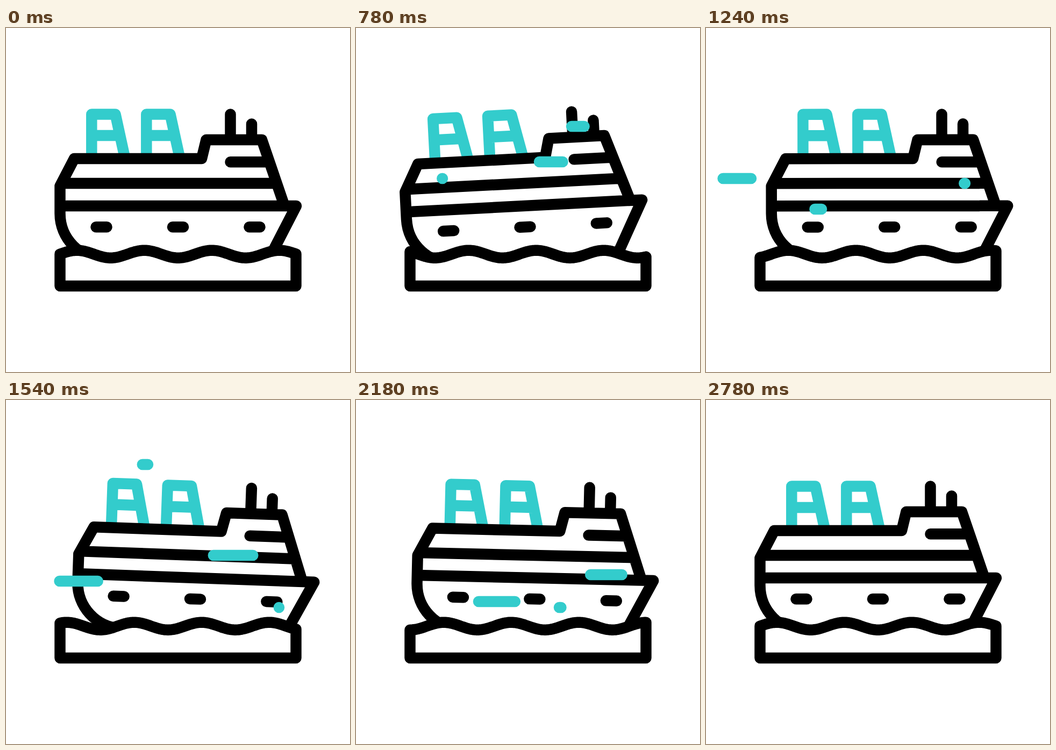
An HTML page that plays this animation: 640 by 640 pixels, repeating every 2.8 s.

```html
<!DOCTYPE html>
<html lang="en">
<head>
<meta charset="utf-8">
<title>Cruise ship</title>
<style>
  html, body { margin: 0; height: 100%; overflow: hidden; background: #fff; }
  svg { display: block; width: 100vw; height: 100vh; }
  g, path { fill: none; stroke-width: 20.5; stroke-linejoin: round; }
  .ink { stroke: #000; stroke-linecap: round; }
  .teal { stroke: #33cccc; }
  #water { fill: #fff; }
  #wind { stroke-linecap: round; }
</style>
</head>
<body>
<svg viewBox="0 0 640 640">
  <g id="ship">
    <g class="teal">
      <path id="funnel" d="M159.3 243V160.5H203.5L221.5 243M159.3 200H212"/>
      <use href="#funnel" x="102"/>
    </g>
    <path class="ink" d="M185 430C138 430 100.5 392 100.5 345V294L127 243H364L372.5 208H476L517 328
      M112 289H502M112 331H540L489 430
      M417.5 249.3H490M417.5 160.5V205M457 178.5V205"/>
    <path id="porthole" class="ink" d="M167.5 370.3h20"/>
    <use href="#porthole" x="142.5"/>
    <use href="#porthole" x="285"/>
  </g>
  <path id="water" class="ink"/>
  <path id="wind" class="teal"/>
</svg>
<script>
const LOOP = 2800, WAVELENGTH = 125.6;
const GUST = { length: 130, duration: 500, delay: 200 };
const [ship, water, wind] = ['ship', 'water', 'wind'].map(id => document.getElementById(id));

// Each gust: start time, then the point it blows left from
const gusts = [
  [217, 531, 183], [275, 471, 249], [760, 161, 280],
  [1145, 215, 337], [1208, 482, 289], [1455, 264, 120],
  [1530, 508, 386], [1720, 564, 325], [1900, 305, 375]
];

function ease(t, start, end) {
  const u = Math.min(1, Math.max(0, (t - start) / (end - start)));
  return u * u * (3 - 2 * u);
}

// Swings from rest to low, across to high, and back to rest
function swing(t, [start, dip, peak, end], low, high) {
  return low * ease(t, start, dip) + (high - low) * ease(t, dip, peak) - high * ease(t, peak, end);
}

function waterPath(t) {
  const crest = 257.4 - 2 * WAVELENGTH * ease(t, 0, LOOP);
  let d = 'M100.5 480';
  for (let x = 100.5; x <= 539.5; x += 2.195) {
    const y = 420.7 - 7 * Math.cos((x - crest) * 2 * Math.PI / WAVELENGTH);
    d += `L${x.toFixed(2)} ${y.toFixed(2)}`;
  }
  return d + 'L539.5 480Z';
}

function gustPath(t, [start, x, y]) {
  const reach = from => x - GUST.length * ease(t, from, from + GUST.duration);
  const head = reach(start), tail = reach(start + GUST.delay);
  return tail - head > 0.01 ? `M${tail} ${y}H${head}` : '';
}

function draw(now) {
  const t = now % LOOP;
  const drift = swing(t, [0, 540, 1600, 2620], -14.5, 34.2);
  const tilt = swing(t, [300, 680, 1760, 2600], -3.1, 2.65);
  ship.setAttribute('transform', `translate(${drift}) rotate(${tilt} 320 320)`);
  water.setAttribute('d', waterPath(t));
  wind.setAttribute('d', gusts.map(gust => gustPath(t, gust)).join(''));
}

const begin = performance.now();
function tick() {
  draw(performance.now() - begin);
  requestAnimationFrame(tick);
}
tick();
</script>
</body>
</html>
```
